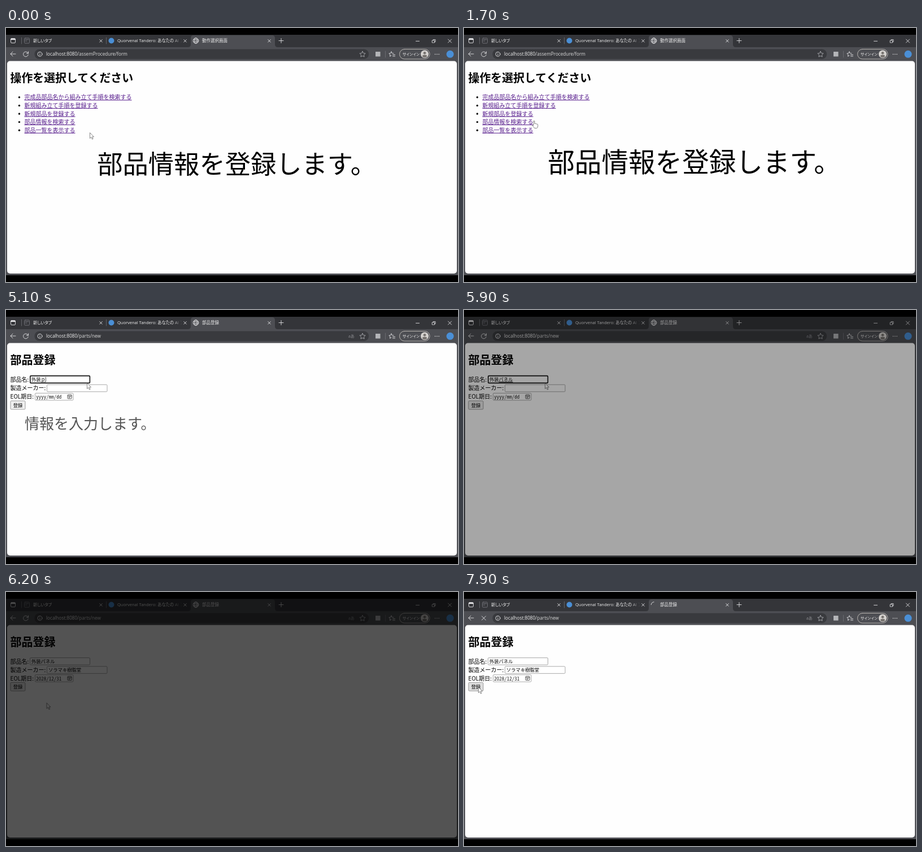
Write an HTML page that moves like this. It is 800 px wide and 450 px high and loops after 8 s.

```html
<!DOCTYPE html>
<html lang="ja">
<head>
<meta charset="utf-8">
<title>部品登録</title>
<style>
  html, body { margin: 0; width: 100%; height: 100%; overflow: hidden; background: #000; }
  svg { display: block; width: 100vw; height: 100vh; }
  text { font-family: "Noto Sans CJK JP", "Noto Sans CJK", sans-serif; white-space: pre; }
  .ui { font-family: "Open Sans", "Noto Sans CJK JP", sans-serif; font-feature-settings: "palt"; fill: #f0f0f0; }
  .mono { font-family: "Noto Sans Mono CJK JP", "Noto Sans Mono", monospace; }
  .icon { fill: none; stroke: #e4e4e6; stroke-width: .9; stroke-linecap: round; stroke-linejoin: round; }
  .link { fill: #551a8b; text-decoration: underline; }
</style>
</head>
<body>
<svg viewBox="0 0 800 450">
  <defs>
    <linearGradient id="fade" gradientUnits="userSpaceOnUse" x1="294" x2="312" y1="0" y2="0">
      <stop offset="0" stop-color="#f0f0f0"/><stop offset="1" stop-color="#f0f0f0" stop-opacity="0"/>
    </linearGradient>
  </defs>
  <rect width="800" height="450"/>
  <rect y="12" width="800" height="426" fill="#4d4e53"/>
  <rect y="12" width="800" height="22" fill="#343539"/>
  <path d="M322 34q5 0 5-5V18q0-5 5-5H471q5 0 5 5V29q0 5 5 5Z" fill="#4d4e53"/>
  <rect x="50" y="37" width="592.5" height="18.5" rx="9" fill="#393a3e" stroke="#55565b" stroke-width=".6"/>
  <rect x="2" y="58.5" width="796" height="376.5" rx="5" fill="#fefefe"/>
  <g class="icon">
    <rect x="8.5" y="18.5" width="8" height="8" rx="1.5"/><path d="M9 20h7" stroke-width="2"/>
    <path d="M27.5 17V28M177.5 17V28M671.5 41V52" stroke="#77787d" stroke-width=".7"/>
    <g stroke="#77787d"><rect x="32.5" y="18" width="9" height="9" rx="1.5"/><path d="M34 20.5h6M34 23h3"/></g>
    <path d="M483 22.5h8M487 18.5v8M725.5 23.3h6M782.5 20l6 6m0-6l-6 6"/>
    <path d="M754.5 22h4v4h-4zM756 22v-1.5h4V24.500h-1.500" stroke-width=".8"/>
    <path d="M17 46H8m4-4l-4 4 4 4"/>
    <circle cx="60" cy="46.300" r="4"/><path d="M60 46v2.300M60 44.200v.1"/>
    <path id="star" stroke="#aaabaf" d="M631 41.300l1.500 3.200 3.600.5-2.600 2.500.6 3.600-3.100-1.700-3.100 1.700.6-3.600-2.600-2.500 3.600-.5Z"/>
    <path d="M682 42l1.200 2.700 3 .4M682 42l-1.300 2.700-2.900.4 2.100 2.100-.5 3 2.600-1.400M684.500 47.500h4M684.500 50h4"/>
    <rect x="696.5" y="37.500" width="53.500" height="17.500" rx="8.700" stroke="#c4c0bb"/>
    <path d="M759.500 46.500h.1M762.800 46.500h.1M766.100 46.500h.1" stroke-width="1.500"/>
  </g>
  <g id="closers" class="icon"></g>
  <circle cx="186.500" cy="22.500" r="5" fill="#4a8fd6"/>
  <circle cx="786" cy="46.300" r="6.500" fill="#4a8fd6"/>
  <rect x="654" y="42" width="8.500" height="8.500" fill="#b4b5b8"/>
  <circle cx="741" cy="46.300" r="7" fill="#d3d0cd"/>
  <circle cx="741" cy="44.300" r="2.300" fill="#75716e"/>
  <path d="M736.800 50.500a4.200 3 0 0 1 8.400 0a6 6 0 0 1-8.400 0" fill="#75716e"/>
  <text class="ui" x="48" y="25.300" font-size="7.300">新しいタブ</text>
  <text class="ui" x="197" y="25.300" font-size="7.500" style="fill:url(#fade)">Quorvenal Tandero: あなたの AI アシ</text>
  <text class="ui" x="702" y="48.900" font-size="6.700">サインイン</text>
  <g id="scene"></g>
  <rect id="shade" width="800" height="450" opacity="0"/>
</svg>
<script>
const LOOP = 8000, PAGE_AT = 2600, CUT = 6100, FADE = 306;
const scene = document.getElementById("scene");
const shade = document.getElementById("shade");
document.getElementById("closers").innerHTML = [168, 317, 466]
  .map(x => `<path d="M${x - 2.3} 20.500l4.600 4.600m0-4.600l-4.600 4.600"/>`).join("");

const clamp = v => Math.max(0, Math.min(1, v));
const ramp = (t, a, b) => clamp((t - a) / (b - a));
const mix = (a, b, p) => a + (b - a) * p;
const latest = (t, steps) => steps.reduce((found, s) => t >= s[0] ? s : found, steps[0]);

// Text placed by the vertical centre of its full-width glyphs
const label = (x, cy, size, str, attrs = "") =>
  `<text x="${x}" y="${cy + size * .38}" font-size="${size}" ${attrs}>${str}</text>`;
const box = (x, cy, w, h, fill = "#fff", stroke = "#858585", sw = .7) =>
  `<rect x="${x}" y="${cy - h / 2}" width="${w}" height="${h}" rx="1.500" fill="${fill}" stroke="${stroke}" stroke-width="${sw}"/>`;

const LINKS = ["完成品部品名から組み立て手順を検索する", "新規組み立て手順を登録する",
  "新規部品を登録する", "部品情報を検索する", "部品一覧を表示する"];

// time, committed text, text being composed
const TYPING = [[0, "", ""], [3600, "", "ｇ"], [3720, "", "が"], [3880, "", "がい"], [4020, "", "がいｓ"],
  [4160, "", "がいそ"], [4320, "", "がいそう"], [4600, "", "外装"], [5050, "外装", "ｐ"], [5200, "外装", "ぱ"],
  [5300, "外装", "ぱｎ"], [5400, "外装", "ぱね"], [5500, "外装", "ぱねｒ"], [5600, "外装", "ぱねる"], [5750, "外装", "パネル"]];

// time, x, y
const POINTER = [[0, 148.500, 185.500], [500, 148.500, 185.500], [1500, 124, 164.500], [1700, 124, 164.500],
  [2100, 110, 153], [2500, 110, 153], [2900, 150.500, 137], [3300, 150.500, 137], [3600, 143.500, 129.500],
  [CUT - 1, 143.500, 129.500], [CUT, 72, 196.500], [6450, 72, 196.500], [7100, 25.500, 168.500], [LOOP, 25.500, 168.500]];

function pointerAt(t) {
  const i = POINTER.findIndex(k => k[0] > t);
  const [a, b] = [POINTER[i - 1], POINTER[i]];
  const p = ramp(t, a[0], b[0]), e = p * p * (3 - 2 * p);
  return [mix(a[1], b[1], e), mix(a[2], b[2], e)];
}

function pointer(t) {
  const [x, y] = pointerAt(t);
  const at = `transform="translate(${x} ${y})" stroke="#555" stroke-width=".7" stroke-linejoin="round"`;
  if (t < PAGE_AT && x < 125)
    return `<path ${at} fill="#fff" d="M-1 .5q1-1 2 0V5q1.500-.8 2 .3 1.500-.5 1.900.5 1.800-.3 1.800 1.200V9.500q0 3-2 3.500H.8Q-.5 11-3 8.300q0-1.500 2-.3Z"/>`;
  if (t >= PAGE_AT && t < CUT && x > 72 && y > 131 && y < 146)
    return `<path ${at} stroke="#222" fill="none" d="M-2.500-5.500h5M0-5.500v11M-2.500 5.500h5"/>`;
  return `<path ${at} fill="#fff" d="M0 0V10l2.300-2.100 1.700 3.700 1.600-.7-1.600-3.600H7Z"/>`;
}

function menuPage() {
  return label(7.500, 88, 19.900, "操作を選択してください", 'font-weight="700"') +
    LINKS.map((s, i) => {
      const y = 122.500 + i * 14.600;
      return `<circle cx="23.500" cy="${y + .3}" r="1.700"/>` + label(32.500, y, 10, s, 'class="link"');
    }).join("");
}

function composing(t, cy) {
  const [since, done, draft] = latest(t, TYPING);
  const start = 45 + done.length * 8.300, end = start + draft.length * 8.300;
  let out = label(45, cy, 8.300, done + draft);
  if (draft) out += `<path d="M${start} ${cy + 4.500}H${end}" stroke="#000" stroke-width="${/パ|装/.test(draft) ? 1 : .5}"/>`;
  const blink = (t - Math.max(since, PAGE_AT)) % 1000 < 500;
  if (blink && draft !== "パネル") out += `<path d="M${end + .5} ${cy - 4.500}v9" stroke="#000" stroke-width=".7"/>`;
  return out;
}

function formPage(t) {
  const filled = t >= CUT;
  // Filled fields are slightly shorter, pulling later rows up
  const [y1, y2, y3, y4] = filled ? [122.800, 137.800, 152.700, 167.700]
    : t >= 3600 ? [122.800, 138.200, 153.400, 168.400] : [123.200, 139, 154.200, 169.300];
  const button = t >= 7400 && t < 7500 ? "#f5f5f5" : t > 7050 ? "#dedede" : "#efefef";
  return label(7.500, 88, 20, "部品登録", 'font-weight="700"') +
    label(7.500, 122.800, 10, "部品名:") + label(7.500, y2, 10, "製造メーカー:") + label(7.500, y3, 10, "EOL期日:") +
    (filled ? box(42.500, y1, 106, 12.500) + label(45, y1 + .3, 8.300, "外装パネル")
      : box(42.800, y1 + .2, 105.600, 12.800, "#fff", "#111", 1.600) + composing(t, y1 + .3)) +
    box(72.500, y2 + .3, 106.500, 12.500) + (filled ? label(75, y2 + .5, 8.300, "ソラマキ樹脂堂") : "") +
    box(51.500, y3 + .2, 67.500, 12.500) +
    label(53.200, y3 + .4, 9, filled ? "2028/12/31" : "yyyy/mm/dd", 'class="mono" fill="#222"') +
    `<g transform="translate(109 ${y3 - 3.300})" fill="none" stroke="#333" stroke-width=".8">
      <rect width="7.200" height="7" rx="1"/><path d="M0 2h7.200M1.700 3.700h4M1.700 5.300h2.500"/></g>` +
    box(8, y4 + .1, 26, 15, button, "#777") + label(12.700, y4, 8.300, "登録");
}

function browserState(t) {
  const form = t >= PAGE_AT;
  const loading = t >= 7500 || (t >= 2250 && t < PAGE_AT);
  const path = form ? "/parts/new" : "/assemProcedure/form";
  let out = `<text class="ui" x="347" y="25.300" font-size="7.500">${form ? "部品登録" : "動作選択画面"}</text>` +
    `<text class="ui" x="71" y="49.300" font-size="8.200">localhost:8080<tspan fill="#dadada">${path}</tspan></text>`;
  if (form) out += `<text class="ui" x="606" y="48.800" font-size="7" style="fill:#8f9094">aあ</text>`;
  out += loading
    ? `<path class="icon" d="M31.500 42.800l7 7m0-7l-7 7"/>
       <path class="icon" transform="rotate(${(t - 7900) * .36} 336 22.500)" d="M331.200 22.500a4.800 4.800 0 0 1 4.800-4.800"/>`
    : `<path class="icon" d="M39.200 45a4.400 4.400 0 1 0 .1 2.500M39.500 41.800V45h-3.200"/>
       <g class="icon" stroke-width=".8"><circle cx="336" cy="22.500" r="4.800"/><ellipse cx="336" cy="22.500" rx="2.200" ry="4.800"/><path d="M331.500 20.800h9M331.500 24.200h9"/></g>`;
  return out;
}

function captions(t) {
  if (t < PAGE_AT) {
    const p = t / 1700, size = mix(45.300, 47.600, p);
    return label(mix(161.200, 148.200, p), mix(240.500, 237.300, p), size, "部品情報を登録します。",
      `opacity="${1 - ramp(t, 2300, PAGE_AT)}"`);
  }
  const alpha = ramp(t, 2700, 3000) * (1 - ramp(t, 5000, 5300));
  return alpha ? label(33, 200.700, 26, "情報を入力します。", `opacity="${alpha}"`) : "";
}

function render(t) {
  scene.innerHTML = browserState(t) + (t < PAGE_AT ? menuPage() : formPage(t)) + captions(t) + pointer(t);
  shade.setAttribute("opacity", clamp(1 - Math.abs(t - CUT) / FADE));
}

const origin = performance.now();
function tick() {
  render((performance.now() - origin) % LOOP);
  requestAnimationFrame(tick);
}
tick();
</script>
</body>
</html>
```
